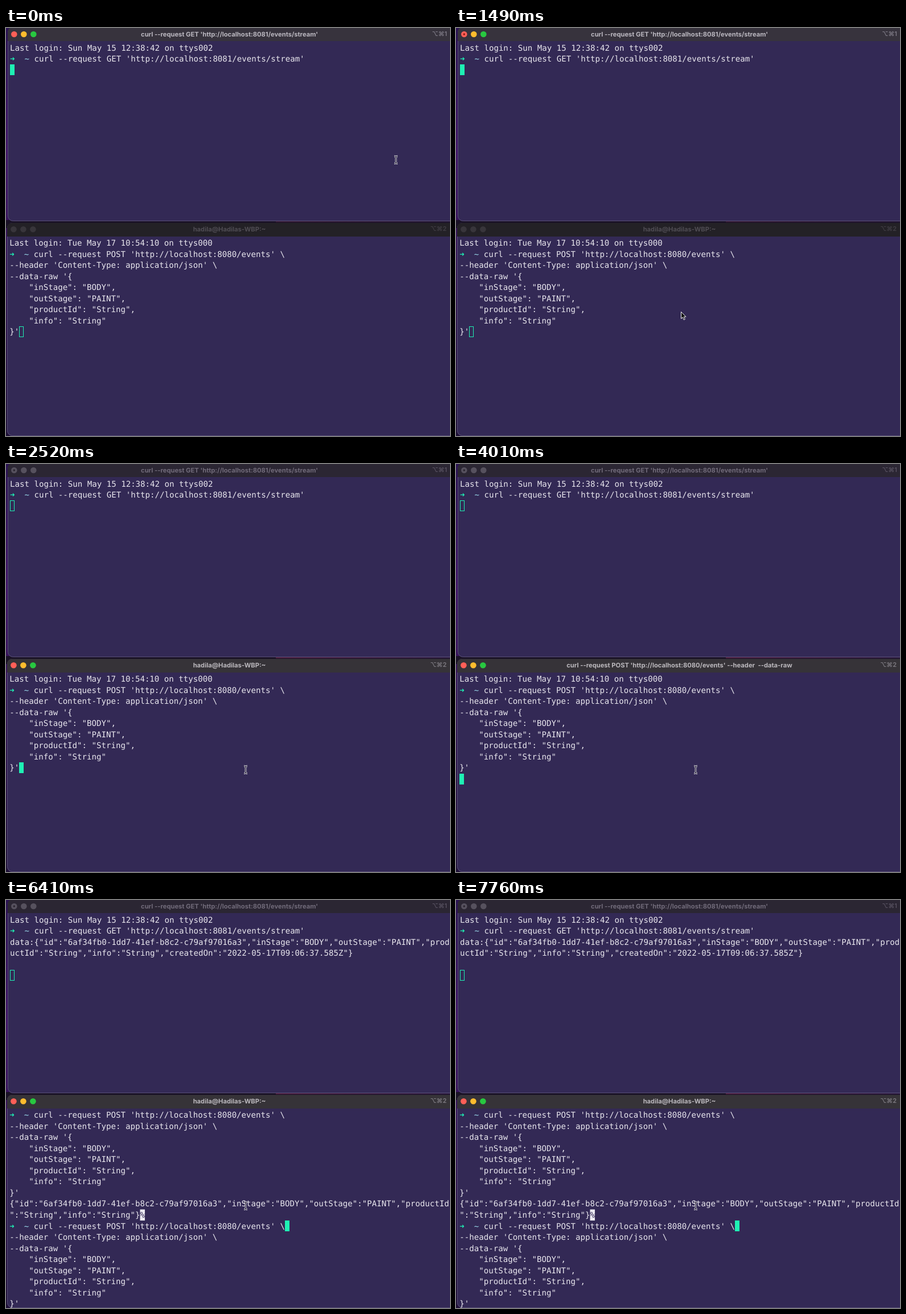
Animation of 780x718 px, one loop 8000 ms. Source, as an HTML page:

```html
<!DOCTYPE html>
<html lang="en">
<head>
<meta charset="utf-8">
<title>Event stream terminals</title>
<style>
  html, body { margin: 0; width: 100%; height: 100%; overflow: hidden; background: #1b1030; }
  svg { display: block; }
  text { white-space: pre; text-rendering: geometricPrecision; }
  .mono { font: 14.1px "DejaVu Sans Mono", monospace; fill: #e9e7ee; }
  .title { font: 700 11.2px Inter, sans-serif; text-anchor: middle; }
  .key { font: 600 11px Inter, "DejaVu Sans", sans-serif; text-anchor: end; }
</style>
</head>
<body>
<svg id="stage" width="780" height="718" viewBox="0 0 780 718">
  <defs>
    <linearGradient id="desk" x2="0" y2="1">
      <stop offset="0" stop-color="#2a1252"/>
      <stop offset=".3" stop-color="#401468"/>
      <stop offset="1" stop-color="#1e1036"/>
    </linearGradient>
    <linearGradient id="glow">
      <stop offset="0" stop-color="#5b2347"/>
      <stop offset="1" stop-color="#33204a"/>
    </linearGradient>
  </defs>
  <rect width="780" height="718" fill="url(#desk)"/>
  <rect y="338" width="780" height="14" fill="#1a1226"/>
  <g id="top"></g>
  <g id="bottom"></g>
  <g id="pointer"></g>
</svg>
<script>
const LOOP = 8000, CELL = 8.488, ROW = 19.55;
const GREEN = '#1ff0b4', INK = '#332955';
const HOST = 'hadila@Hadilas-WBP:~';
const GET = "curl --request GET 'http://localhost:8081/events/stream'";
const POST = [
  "$curl --request POST 'http://localhost:8080/events' \\",
  "--header 'Content-Type: application/json' \\",
  "--data-raw '{",
  '    "inStage": "BODY",',
  '    "outStage": "PAINT",',
  '    "productId": "String",',
  '    "info": "String"',
  "}'"
];
const EVENT = '{"id":"6af34fb0-1dd7-41ef-b8c2-c79af97016a3","inStage":"BODY","outStage":"PAINT","prod';
const REPLY = [EVENT + 'uctId', '":"String","info":"String"}%'];
const LOGIN = 'Last login: Tue May 17 10:54:10 on ttys000';

// start time, x, y, shape
const MOVES = [
  [0, 685, 232, 'beam'], [600, 655, 243, 'beam'], [740, 633, 284, 'beam'],
  [890, 630, 269, 'arrow'], [1040, 422, 424, 'arrow'], [1190, 407, 482, 'arrow'],
  [1340, 404, 482, 'arrow'], [1490, 395, 499, 'arrow'], [1630, 397, 503, 'beam'],
  [2070, 433, 540, 'beam'], [2220, 432, 461, 'beam'], [2370, 440, 532, 'beam'],
  [2520, 421, 538, 'beam']
];
const BEAM = 'M-3-6.5Q0-6.5 0-4Q0-6.5 3-6.5M0-5V5M-3 6.5Q0 6.5 0 4Q0 6.5 3 6.5';
const SHAPES = {
  beam: `<path d="${BEAM}" fill="none" stroke="#e2e0e8" stroke-width="2.8"/>
         <path d="${BEAM}" fill="none" stroke="#221c33" stroke-width="1.2"/>`,
  arrow: `<path d="M.5.5V12.5L3.3 10L5.2 14.5L7.3 13.6L5.4 9.2H9Z" fill="#111" stroke="#f2f2f4"/>`
};

const rect = (x, y, w, h, fill, more = '') =>
  `<rect x="${x}" y="${y}" width="${w}" height="${h}" fill="${fill}" ${more}/>`;
const text = (x, y, s, cls = 'mono', fill = '') =>
  `<text x="${x}" y="${y}" class="${cls}"${fill && ` style="fill:${fill}"`}>${s}</text>`;

// A leading $ stands for the shell prompt, a trailing % is shown inverted
function line(x, y, s) {
  if (s[0] === '$')
    return text(x, y, '➜', 'mono', GREEN) + text(x + 3 * CELL, y, '~', 'mono', '#9bdcec') +
      text(x + 5 * CELL, y, s.slice(1));
  if (!s.endsWith('%')) return text(x, y, s);
  const end = x + (s.length - 1) * CELL;
  return text(x, y, s.slice(0, -1)) + rect(end, y - 14.4, CELL, ROW, '#eceaf2') +
    text(end, y, '%', 'mono', INK);
}

function cursor(x, y, solid) {
  const left = Math.round(x), top = Math.round(y - 14.4);
  return solid ? rect(left, top, 8, 19, GREEN)
    : rect(left + .5, top + .5, 7, 18, 'none', `stroke="${GREEN}"`);
}

function frame(x, y, h, bar, r) {
  const round = `rx="${r}"`;
  return rect(x, y, 790, h, INK, round) +
    rect(x + .5, y + .5, 789, h - 1, 'none', round + ' stroke="#6a6088" stroke-opacity=".7"') +
    `<path d="M${x} ${y + 24}V${y + r}q0-${r} ${r}-${r}H780V${y + 24}Z" fill="${bar}"/>`;
}

function lights(x, y, active, off) {
  return ['#ff5f57', '#febc2e', '#28c840'].map((c, i) =>
    `<circle cx="${x + 17 * i}" cy="${y}" r="5.3" fill="${active ? c : off}"/>`).join('');
}

function topWindow(t) {
  const active = t < 1630, got = t >= 4460;
  const lines = ['Last login: Sun May 15 12:38:42 on ttys002', '$' + GET];
  if (got) lines.push('data:' + EVENT, 'uctId":"String","info":"String","createdOn":"2022-05-17T09:06:37.585Z"}');
  return rect(474, 340, 306, 2, 'url(#glow)', `opacity="${active ? .4 : .8}"`) +
    frame(3, -1, 341, active ? '#37333d' : '#2b2633', 9) +
    lights(14.3, 11, active, '#56515e') +
    (t >= 300 ? `<circle cx="14.3" cy="11" r="1.7" fill="${active ? '#8c1a12' : '#29242f'}"/>` : '') +
    text(392.5, 14.5, GET, 'title', active ? '#bbb8c0' : '#716b7a') +
    text(775, 14, '⌥⌘1', 'key', active ? '#7d7985' : '#575160') +
    lines.map((s, i) => line(7, 39.6 + ROW * i, s)).join('') +
    cursor(7, 39.6 + ROW * (got ? 5 : 2), t < 1780);
}

function bottomWindow(t) {
  const active = t >= 1630, running = t >= 4010 && t < 4460;
  let lines = [LOGIN, ...POST], col = 2, row = 8;
  if (running) [col, row] = [0, 9];
  if (t >= 4460) {
    lines.push(...REPLY, '$');
    [col, row] = [5, 11];
  }
  if (t >= 6410) {
    const cleared = t >= 7310 && t < 7760;
    lines = [...POST, ...REPLY, ...(cleared ? ['$'] : POST)];
    [col, row] = [cleared ? 5 : 57, 10];
  }
  const title = running ? "curl --request POST 'http://localhost:8080/events' --header  --data-raw" : HOST;
  const x = 6.3, y = 383;
  return frame(2, 343, 375, active ? '#363338' : '#232126', 9) +
    lights(13.4, 354.3, active, '#38353b') +
    text(392.5, 357.7, title, 'title', active ? '#bbb8bd' : '#504d54') +
    text(774, 357.2, '⌥⌘2', 'key', active ? '#7d7a80' : '#403d44') +
    lines.map((s, i) => line(x, y + ROW * i, s)).join('') +
    cursor(x + col * CELL, y + ROW * row, t >= 1780);
}

const CUTS = [0, 300, 1630, 1780, 4010, 4460, 6410, 7310, 7760];
const el = id => document.getElementById(id);
let shownCut, shownMove;

function draw(now) {
  const t = now % LOOP;
  const cut = CUTS.findLast(c => c <= t);
  const move = MOVES.findLast(m => m[0] <= t);
  if (cut !== shownCut) {
    el('top').innerHTML = topWindow(cut);
    el('bottom').innerHTML = bottomWindow(cut);
    shownCut = cut;
  }
  if (move !== shownMove) {
    const [, x, y, shape] = move;
    el('pointer').innerHTML = SHAPES[shape];
    el('pointer').setAttribute('transform', `translate(${x} ${y})`);
    shownMove = move;
  }
  requestAnimationFrame(draw);
}
draw(0);
</script>
</body>
</html>
```
